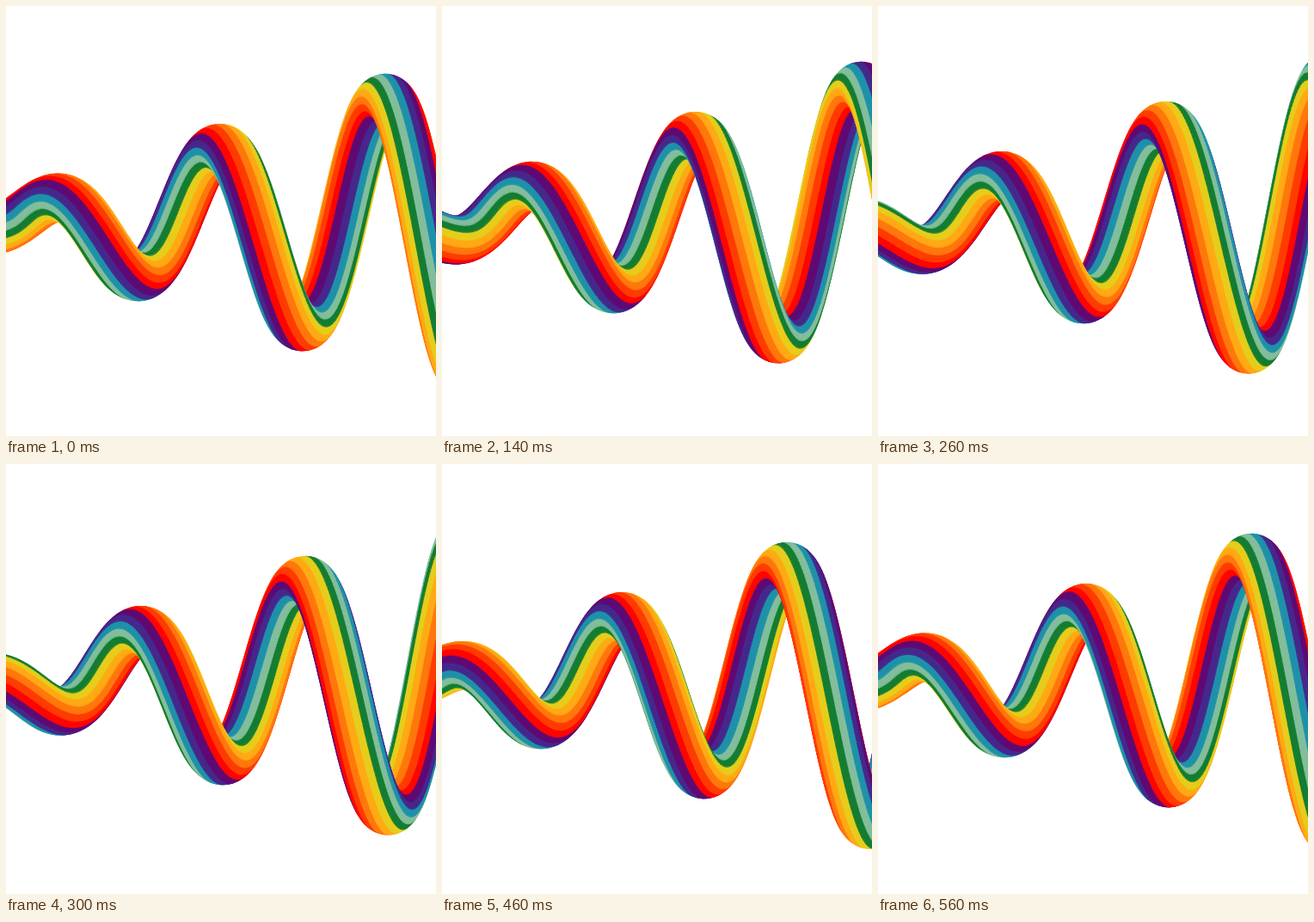
An HTML page with a canvas for the animation above (580 ms loop, 500 px wide and 500 px high).

```html
<!DOCTYPE html>
<html lang="en">
<head>
<meta charset="utf-8">
<title>Rainbow coil</title>
<style>
html, body { margin: 0; width: 100%; height: 100%; overflow: hidden; background: #fff; }
canvas { display: block; }
</style>
</head>
<body>
<canvas id="stage" width="500" height="500"></canvas>
<script>
const ctx = document.getElementById('stage').getContext('2d');
const COLORS = ['#ff0400', '#ff3c00', '#ff780c', '#ffaa14', '#e6cd1c',
                '#147d32', '#82be9b', '#1e91aa', '#46288c', '#5f0a74'];
const LOOP = 580, TICK = 20;
const WAVE = 193.5, PITCH = WAVE / (2 * Math.PI);
const PEAK_X = 245.5, AXIS_Y = 254.6;
const TUBE = 28.5, SLOPE = 0.302, BASE = 14.6;
const STRIPE = Math.PI / 10, SLICES = 40, STEP = 1.5, OVERLAP = 0.05;

const cross = (a, b) => [
  a[1] * b[2] - a[2] * b[1],
  a[2] * b[0] - a[0] * b[2],
  a[0] * b[1] - a[1] * b[0]
];
const unit = v => {
  const len = Math.hypot(...v);
  return v.map(n => n / len);
};

// Cross-section of the tube at x: centre, two normals and the stripe offset.
function ring(x, phase) {
  const radius = BASE + SLOPE * x;
  const angle = (x - PEAK_X) / PITCH - 2 * Math.PI * phase;
  const cos = Math.cos(angle), sin = Math.sin(angle), turn = radius / PITCH;
  const tangent = unit([1, SLOPE * cos - turn * sin, SLOPE * sin + turn * cos]);
  const side = unit(cross(tangent, [0, cos, sin]));
  const out = cross(side, tangent);
  // The stripes follow the coil without twisting about its own centre line.
  const shift = 11.2 - Math.asinh(turn) / (SLOPE * STRIPE) + 10 * phase;
  return { x, y: radius * cos, z: radius * sin, out, side, shift };
}

const facing = (r, a) => r.out[2] * Math.cos(a) + r.side[2] * Math.sin(a);
const point = (r, a) => {
  const c = TUBE * Math.cos(a), s = TUBE * Math.sin(a);
  return [r.x + r.out[0] * c + r.side[0] * s,
          AXIS_Y - r.y - r.out[1] * c - r.side[1] * s];
};

function draw(phase) {
  const rings = [];
  for (let x = -40; x <= 545; x += STEP) rings.push(ring(x, phase));
  const segments = rings.slice(0, -2)
    .map((a, i) => ({ a, b: rings[i + 2], z: rings[i + 1].z }))
    .sort((p, q) => p.z - q.z);

  ctx.fillStyle = '#fff';
  ctx.fillRect(0, 0, 500, 500);
  for (const { a, b } of segments) {
    for (let i = 0; i < SLICES; i++) {
      const start = r => (r.shift + 0.5 - i / 2) * STRIPE;
      const from = start(a), to = start(b);
      if (facing(a, from - STRIPE / 4) <= 0) continue;
      const span = STRIPE / 2 + OVERLAP;
      ctx.fillStyle = COLORS[(i >> 1) % 10];
      ctx.beginPath();
      ctx.moveTo(...point(a, from));
      ctx.lineTo(...point(b, to));
      ctx.lineTo(...point(b, to - span));
      ctx.lineTo(...point(a, from - span));
      ctx.fill();
    }
  }
}

const begin = performance.now();
let shown = -1;
function frame() {
  const tick = Math.floor((performance.now() - begin) % LOOP / TICK);
  if (tick !== shown) draw(tick * TICK / LOOP);
  shown = tick;
  requestAnimationFrame(frame);
}
frame();
</script>
</body>
</html>
```
